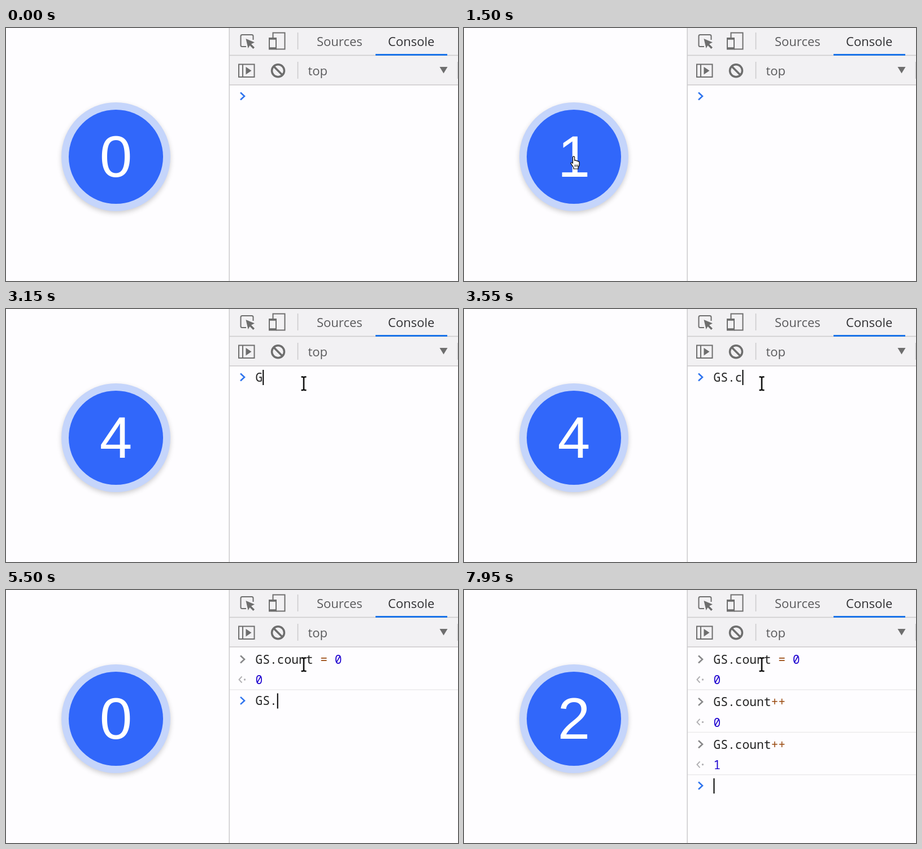
Write an HTML page that moves like this. It is 800x449 px and loops after 8000 ms.

```html
<!DOCTYPE html>
<html lang="en">
<head>
<meta charset="utf-8">
<title>Counter and console</title>
<style>
  html, body { margin: 0; width: 100%; height: 100%; overflow: hidden; background: #fefdff; }
  svg { display: block; }
  .ui { font: 22px "Open Sans", "Noto Sans", sans-serif; fill: #5a5a5c; }
  .code { font: 21.25px "Noto Sans Mono", monospace; fill: #222; }
  .op { fill: #9a4a10; }
  .num { fill: #1c00cf; }
  .icon { fill: none; stroke: #6e6e6e; stroke-width: 2; }
  .solid { fill: #6e6e6e; stroke: none; }
  .rule { stroke: #cbcacc; stroke-width: 1.5; }
  #count { font: 103.5px "Liberation Sans", Arial, sans-serif; fill: #fff; text-anchor: middle; }
</style>
</head>
<body>
<svg width="800" height="449" viewBox="0 0 800 449">
  <defs>
    <filter id="soft" x="-20%" y="-20%" width="140%" height="140%">
      <feGaussianBlur stdDeviation="5"/>
    </filter>
  </defs>
  <rect width="800" height="449" fill="#fefdff"/>

  <circle cx="194.5" cy="232" r="96" fill="#000" opacity=".2" filter="url(#soft)"/>
  <circle cx="194.5" cy="228.5" r="96.5" fill="#c5d5fb"/>
  <circle cx="194.5" cy="228.5" r="83.5" fill="#3167fa"/>
  <text id="count" x="194.5" y="264">0</text>

  <rect x="395" width="405" height="101" fill="#f2f1f3"/>
  <path class="rule" d="M395.2 0V449M395 48.5H800M395 101H800M516.5 8V38M516.5 60V90M799.5 60V90"/>
  <path d="M654 47.5H781" stroke="#1a73e8" stroke-width="3"/>
  <g class="icon">
    <path d="M437.5 21V14.500q0-2.500-2.500-2.500H418q-2.500 0-2.500 2.500V30.500q0 2.500 2.500 2.500H425"/>
    <path class="solid" d="M424.500 19L440 25.500 434 28.500 440 34.500 437.500 37 431.500 31 428.500 36Z"/>
    <path d="M472.500 17V8.500H493.500V37.500H478"/>
    <path d="M466 18H478V37.500H466Z"/>
    <path d="M466 19H478M466 36H478" stroke-width="3.500"/>
    <path d="M412 64.500H439.500V87H412ZM419 64.500V87"/>
    <path class="solid" d="M424.500 69L434.500 75.700 424.500 82.500Z"/>
    <g stroke-width="3.500"><circle cx="481.500" cy="75.700" r="11"/><path d="M474 68.200L489 83.200"/></g>
    <path class="solid" d="M767.500 69H781.500L774.500 80.500Z"/>
  </g>
  <text class="ui" x="550" y="32">Sources</text>
  <text class="ui" x="676" y="32" style="fill:#303033">Console</text>
  <text class="ui" x="534.5" y="84">top</text>

  <g id="log"></g>
  <g id="pointer"></g>
</svg>

<script>
const LOOP = 8000, CHAR = 12.75, ROW = 75.4;
const $ = id => document.getElementById(id);
const evenly = (n, start, step) => Array.from({ length: n }, (_, i) => start + i * step);

// Each command: its text, key press times, the time of Enter and the printed result.
const commands = [
  { text: 'GS.count = 0', keys: evenly(12, 3100, 127), enter: 4850, result: 0 },
  { text: 'GS.count++', keys: [...evenly(8, 5300, 93), 6500, 6620], enter: 6850, result: 0 },
  { text: 'GS.count++', keys: evenly(10, 7250, 0), enter: 7650, result: 1 },
  { text: '', keys: [], enter: Infinity }
];
// [time, number on the button]
const counts = [[0, 0], [1150, 1], [1550, 2], [1950, 3], [2300, 4], [4850, 0], [6850, 1], [7650, 2]];
const FOCUS = 2980;

const shapes = {
  arrow: '<path d="M0 0V17L4 13.500 6.500 19.500 9.500 18.200 7 12.500H12Z" fill="#fff" stroke="#000"/>',
  hand: `<path d="M-1.500 12V1.500a1.600 1.600 0 0 1 3.200 0V7q2-1 3 .8q2-.8 3 .9q2.400-.4 2.400 2V15
    q0 2-2 4v3H0v-2.500q-3-4-5-7.500q.5-2.500 3.500 0Z" fill="#fff" stroke="#000" stroke-width="1.200"/>
    <path d="M2.500 14.500v4M5 14.500v4M7.300 14.500v4" stroke="#000"/>`,
  beam: [['#fff', 4], ['#111', 2.6]].map(([color, width]) =>
    `<path d="M-4.500-11.500H-1.500L0-10 1.500-11.500H4.500M0-10V10.500M-4.500 12H-1.500L0 10.500 1.500 12H4.500"
      fill="none" stroke="${color}" stroke-width="${width}"/>`).join('')
};

const progress = (t, start, end) => {
  const p = Math.min(1, Math.max(0, (t - start) / (end - start)));
  return p * p * (3 - 2 * p);
};

const chevron = (y, color) =>
  `<path d="M415 ${y - 6.5}L422 ${y}L415 ${y + 6.5}" fill="none" stroke="${color}" stroke-width="2.6"/>`;

const code = (text, y) => `<text class="code" x="441.5" y="${y + 7.7}">${
  text.replace(/[=+]+|\d/g, s => `<tspan class="${/\d/.test(s) ? 'num' : 'op'}">${s}</tspan>`)}</text>`;

function finished({ text, result }, y) {
  const r = y + 36.5;
  return chevron(y, '#88888a') + code(text, y) + code(String(result), r) +
    `<path d="M417.500 ${r - 6}L412.500 ${r - .5}L417.500 ${r + 5}" fill="none" stroke="#b2b1b4" stroke-width="2"/>
     <circle cx="422.500" cy="${r - .5}" r="1.700" fill="#b2b1b4"/>
     <path d="M396 ${y + 54}H800" stroke="#ebeaec" stroke-width="1.500"/>`;
}

function prompt({ text, keys }, y, since, t) {
  const pressed = keys.filter(k => k <= t);
  const lastChange = Math.max(since, ...pressed);
  const caretOn = t >= FOCUS && (t - lastChange) % 1000 < 500;
  const x = 442.5 + pressed.length * CHAR;
  return chevron(y, '#2f74ee') + code(text.slice(0, pressed.length), y) +
    (caretOn ? `<path d="M${x} ${y - 13}V${y + 14}" stroke="#000" stroke-width="2"/>` : '');
}

function drawLog(t) {
  const active = commands.findIndex(c => t < c.enter);
  const since = active ? commands[active - 1].enter : FOCUS;
  return commands.slice(0, active).map((c, i) => finished(c, 123 + i * ROW)).join('') +
    prompt(commands[active], 121 + active * ROW, since, t);
}

function drawPointer(t) {
  const enter = progress(t, 150, 920), leave = progress(t, 2500, 2980);
  const x = 232 - 38 * enter + 333 * leave;
  const y = 452 - 224 * enter - 96 * leave;
  const kind = Math.hypot(x - 194.5, y - 228.5) < 96.5 ? 'hand' : x > 425 ? 'beam' : 'arrow';
  return `<g transform="translate(${x} ${y})">${shapes[kind]}</g>`;
}

function render() {
  const t = performance.now() % LOOP;
  $('count').textContent = counts.filter(([time]) => time <= t).pop()[1];
  $('log').innerHTML = drawLog(t);
  $('pointer').innerHTML = drawPointer(t);
  requestAnimationFrame(render);
}
render();
</script>
</body>
</html>
```
